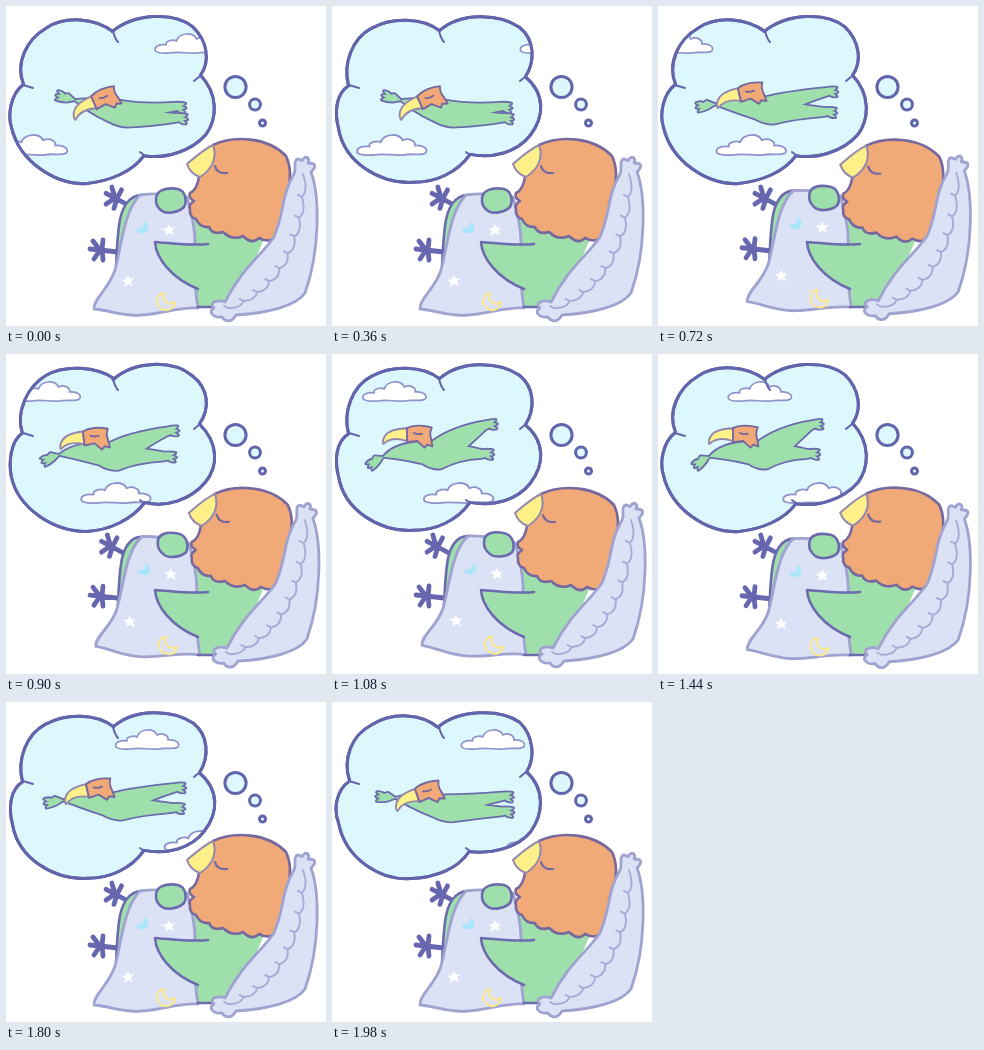
These frames come from a looping animation (320x320 px, 2160 ms). An HTML page:

```html
<!DOCTYPE html>
<html lang="en">
<head>
<meta charset="utf-8">
<title>Dreaming of flight</title>
<style>
html, body { margin: 0; width: 100%; height: 100%; overflow: hidden; background: #fff; }
svg { display: block; width: 100vw; height: 100vh; }
path, circle { stroke-linejoin: round; stroke-linecap: round; }
.sky { fill: #dcf8fd; stroke: #6264ac; stroke-width: 3; }
.edge { fill: none; }
.cloud { fill: #fff; stroke: #9092cc; stroke-width: 1.7; }
.green { fill: #9edfab; }
.dark { stroke: #6b6bad; stroke-width: 2.6; }
.outline { fill: none; }
.orange { fill: #f0a977; stroke: #77699f; stroke-width: 2.6; }
.beak { fill: #fdf089; stroke: #9588ae; stroke-width: 2; }
.linen { fill: #dce2f6; stroke: #a0a2d0; stroke-width: 2.8; }
.seam { fill: none; stroke: #a9abd6; stroke-width: 1.9; }
.face { fill: none; stroke: #77699f; stroke-width: 2.2; }
.foot { fill: none; stroke: #6667ae; stroke-width: 4.8; }
.small, .small * { stroke-width: 1.9; }
</style>
</head>
<body>
<svg viewBox="0 0 320 320">
  <defs>
    <clipPath id="inside"><path id="clip"/></clipPath>
    <path id="puff" d="M1 18C-1 13 6 11 12 12C10 8 19 6 22 8C25 -1 39 -1 42 6C48 3 54 7 53 11C60 10 66 14 63 18C58 21 50 18 43 20C34 21 24 18 16 20C10 20 4 21 1 18Z"/>
    <path id="star" d="M0 -6L2 -2L6 -3L3 1L5 5L0 3L-4 6L-3 1L-7 -1L-2 -2Z"/>
    <path id="moon" d="M-2 -8C-12 -6 -11 8 -1 9C5 10 9 5 9 1C4 5 -5 1 -2 -8Z"/>
    <path id="claw" class="foot" d="M18 2L0 0L-10 -1M0 0L-7 -9M0 0L-6 9M2 0L3 -10M2 0L3 10"/>
  </defs>

  <path id="bubble" class="sky"/>
  <g clip-path="url(#inside)">
    <use id="high" class="cloud" href="#puff"/>
    <use id="low" class="cloud" href="#puff"/>
  </g>
  <g class="small">
    <path id="flyerEdge" class="dark outline" style="stroke-width:3.6"/>
    <path id="flyer" class="green"/>
    <g id="flyerHead">
      <path class="beak" d="M0 -7C-8 -7 -18 -6 -22 0C-24 3 -25 6 -24 8C-18 3 -10 2 0 6Z"/>
      <path class="orange" d="M0 -7C6 -10 16 -10 25 -7C23 -3 23 1 24 4L25 12L20 10L17 13L10 6L0 7Z"/>
      <path class="face" d="M7 -2Q11 0 15 -1"/>
    </g>
  </g>
  <path id="bubbleEdge" class="sky edge"/>
  <path class="sky edge" style="stroke-width:2" d="M107 25Q109 33 112 36M17 79L27 82M194 70L188 75M138 149L134 146"/>
  <g class="sky">
    <circle cx="229.5" cy="81" r="10.6"/>
    <circle cx="249" cy="98.5" r="5.4"/>
    <circle cx="256.5" cy="117" r="3"/>
  </g>

  <use id="footTop" href="#claw"/>
  <use id="footLow" href="#claw"/>
  <path class="green" d="M184 205H270L240 275L216 303L192 301Z"/>
  <g id="cover">
    <path class="green dark" d="M136 189C122 189 115 203 113 220C111 235 111 245 110 260L126 246L150 190Z"/>
    <path class="linen" d="M134 189C149 187 166 188 181 191C185 205 189 220 189 236C188 262 189 285 192 302C172 301 155 308 136 309C117 311 103 304 88 303C87 293 103 283 109 264C116 238 118 205 134 189Z"/>
    <use href="#moon" transform="translate(136 221) scale(-.7 .7)" fill="#a9e6fa"/>
    <g fill="#fff">
      <use href="#star" x="163" y="224"/>
      <use href="#star" x="122" y="275"/>
    </g>
    <use href="#moon" x="160" y="295" fill="none" stroke="#fbe98a" stroke-width="2"/>
    <path class="green dark" d="M150 195C149 184 160 181 172 183C180 185 181 196 178 201C172 207 160 208 156 205C152 202 150 199 150 195Z"/>
  </g>
  <path class="green" d="M215 236C190 240 165 237 149 236C150 252 165 272 192 283L218 284Z"/>
  <path class="dark outline" d="M202 238C185 240 165 237 149 236C150 252 165 272 192 283M192 301H212"/>
  <g id="head">
    <path class="orange" d="M207 139C228 129 262 131 280 150C290 170 280 200 268 232Q262 237 253 232Q246 239 237 230Q226 235 217 226Q206 229 203 221Q194 222 190 213Q183 211 184 203Q182 199 188 195Q182 192 184 187Q191 184 193 171Z"/>
    <path class="beak" d="M181 158C188 152 198 143 207 139C211 150 208 162 194 171C188 169 183 164 181 158Z"/>
    <path class="face" d="M209 160Q211 168 221 167"/>
  </g>
  <g id="cushion">
    <path class="linen" d="M288 168C291 162 287 158 290 154C293 150 296 158 297 153C301 149 304 153 302 157C312 157 309 162 305 166C314 190 314 245 299 287C290 300 262 307 230 309C226 316 220 317 216 311C206 312 202 305 208 302C202 297 211 293 219 296C236 262 255 250 268 231C279 205 275 190 288 168Z"/>
    <path id="ruffle" class="seam"/>
  </g>
</svg>
<script>
const STEP = 180, COUNT = 12;
const $ = id => document.getElementById(id);
const mix = (a, b, t) => a + (b - a) * t;
const mixPoint = (a, b, t) => a.map((v, i) => mix(v, b[i], t));
const setD = (id, d) => $(id).setAttribute('d', d);
const move = (id, x, y, more = '') => $(id).setAttribute('transform', `translate(${x} ${y}) ${more}`);

const bubble = 'M107 25C90 12 60 10 40 22C20 33 10 58 17 79C4 88 2 108 6 122C13 156 48 178 80 177C104 176 126 166 138 149C160 153 185 146 199 129C212 112 213 88 194 70C204 55 202 34 187 21C167 6 128 7 107 25Z';

// Slight redraw of a hand-drawn line.
function wobble(d, state, size) {
  let i = 0;
  return d.replace(/-?[\d.]+/g, n => (+n + size * Math.sin(i++ * 2.3 + state * 1.6)).toFixed(2));
}

// A tapering limb with three feathers at its tip.
function limb(top, bendTop, tip, bendLow, low, angle) {
  const at = (r, a) => [tip[0] + r * Math.cos(a), tip[1] + r * Math.sin(a)];
  let d = `M${top}Q${bendTop} ${at(4, angle - 1.5)}`;
  for (let k = -1; k <= 1; k++) {
    const a = angle + k * 0.38;
    d += `Q${at(8, a - 0.3)} ${at(12, a)}Q${at(8, a + 0.3)} ${at(5, a + 0.2)}`;
  }
  return d + `L${at(4, angle + 1.5)}Q${bendLow} ${low}Z`;
}

// lift: 0 with the wings swept back, 1 at the top of the flight.
function drawFlyer(lift) {
  const p = (x0, y0, x1, y1) => mixPoint([x0, y0], [x1, y1], lift);
  const reach = 9 * Math.sin(Math.PI * lift);
  const neck = p(92, 94, 84, 88), chest = p(104, 116, 90, 109);
  const back = p(114, 95, 98, 88), side = p(128, 113, 126, 100);
  const rump = p(126, 121, 108, 114);
  const farTip = p(64, 91, 45, 106), nearTip = p(167, 103, 150, 69), tailTip = p(169, 113, 146, 99);
  farTip[0] -= reach / 2;
  nearTip[0] += reach;
  tailTip[0] += reach;

  const d = `M${neck}L${back}L${side}L${rump}Q${p(116, 122, 98, 115)} ${chest}Z` +
    limb(neck, p(76, 92, 55, 91), farTip, p(80, 105, 62, 103), chest, mix(3.45, 2.3, lift)) +
    limb(back, p(138, 101, 118, 71), nearTip, p(150, 110, 142, 84), side, mix(0.12, -0.12, lift)) +
    limb(back, p(150, 108, 132, 90), tailTip, p(146, 121, 124, 104), rump, mix(0.1, 0.05, lift));
  setD('flyer', d);
  setD('flyerEdge', d);
  move('flyerHead', ...p(89, 98, 74, 80), `rotate(${mix(-26, 0, lift)})`);
}

// Scallops along the curved seam of the pillow.
function ruffle(count) {
  const seam = t => {
    const q = [[297, 168], [296, 275], [222, 302]];
    return mixPoint(mixPoint(q[0], q[1], t), mixPoint(q[1], q[2], t), t);
  };
  let d = 'M' + seam(0);
  for (let k = 1; k <= count; k++) {
    const [x, y] = seam((k - 0.4) / count), [ex, ey] = seam(k / count);
    d += `Q${x + 6} ${y + 3} ${ex} ${ey}l-4 -2m4 2`;
  }
  return d;
}

function draw(ms) {
  const i = Math.floor(ms / STEP) % COUNT;
  const lift = (1 - Math.cos(2 * Math.PI * (i - 1) / COUNT)) / 2;
  const breath = Math.max(0, Math.sin(Math.PI * (i - 2.5) / 7));

  const edge = wobble(bubble, i % 4, 0.8);
  ['bubble', 'bubbleEdge', 'clip'].forEach(id => setD(id, edge));
  move('low', -9 + 16.7 * i, 128, 'scale(1.1 1.05)');
  move('high', -88 + 19.7 * (i < 3 ? i + COUNT : i), 27);
  drawFlyer(lift);

  // Breathing tips the blanket up around its right side.
  move('cover', 205 + 2 * breath, 0, `skewY(${5.7 * breath}) translate(-205 0)`);
  move('footTop', 109 - 5 * breath, 192, 'rotate(22)');
  move('footLow', 94, 244 - 2 * breath);
  move('head', 2 * breath, breath);
  move('cushion', 2 * breath, -2 * breath);
}

setD('ruffle', ruffle(9));
const start = performance.now();
function tick(now) {
  draw(Math.max(0, now - start));
  requestAnimationFrame(tick);
}
draw(0);
requestAnimationFrame(tick);
</script>
</body>
</html>
```
